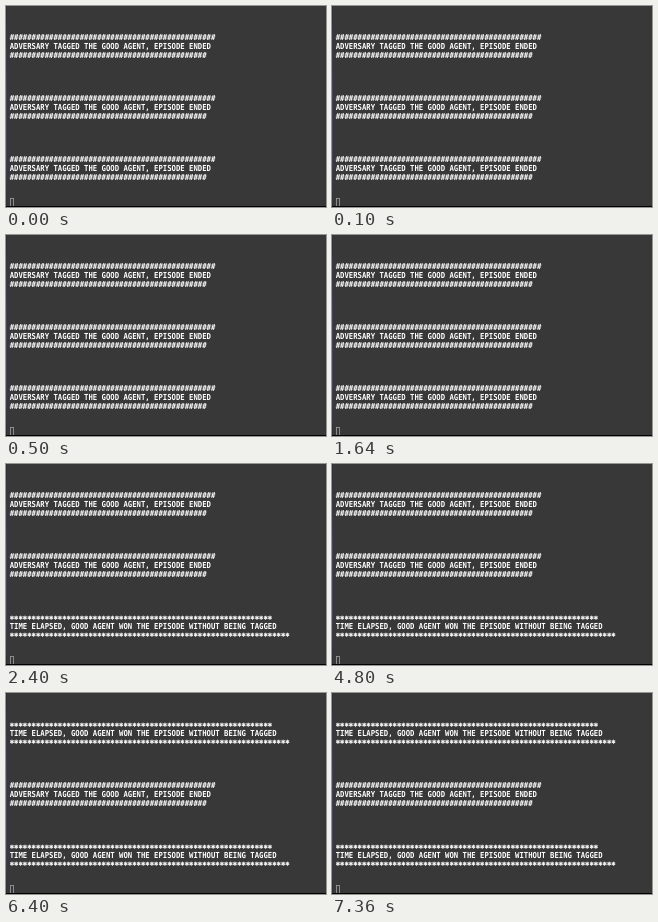
Recreate the animation shown at these times as an HTML page. Size 320 by 201 pixels, loop 8 s.

```html
<!DOCTYPE html>
<html lang="en">
<head>
<meta charset="utf-8">
<title>Episode log</title>
<style>
  html, body { margin: 0; width: 100%; height: 100%; overflow: hidden; background: #383838; }
  svg { display: block; width: 100vw; height: 100vh; }
  text {
    font: bold 7.27px "DejaVu Sans Mono", monospace;
    fill: #fff;
    text-rendering: geometricPrecision;
    white-space: pre;
  }
  .stars { stroke: #fff; stroke-width: .3px; }
  .top > *, .bottom > * { animation: 8s step-end infinite; }
  .top > .tagged { animation-name: top-tagged; }
  .top > .won { animation-name: top-won; }
  .bottom > .tagged { animation-name: bottom-tagged; }
  .bottom > .won { animation-name: bottom-won; }
  @keyframes top-tagged { 0% { visibility: visible } 80%, 100% { visibility: hidden } }
  @keyframes top-won { 0% { visibility: hidden } 80%, 100% { visibility: visible } }
  @keyframes bottom-tagged { 0% { visibility: visible } 30%, 100% { visibility: hidden } }
  @keyframes bottom-won { 0% { visibility: hidden } 30%, 100% { visibility: visible } }
</style>
</head>
<body>
<svg viewBox="0 0 320 201" preserveAspectRatio="none">
  <defs>
    <linearGradient id="edge" x2="0" y2="1">
      <stop offset="0" stop-color="#303034"/>
      <stop offset=".4" stop-color="#45425c"/>
      <stop offset=".75" stop-color="#45425c"/>
      <stop offset="1" stop-color="#303034"/>
    </linearGradient>
  </defs>
  <rect width="320" height="201" fill="#383838"/>
  <rect width="1" height="201" fill="url(#edge)"/>
  <rect x="4.5" y="192.5" width="3" height="8" fill="none" stroke="#a0a0a0" stroke-width=".8"/>
  <rect y="200" width="320" height="1" fill="#000"/>
  <g id="log"></g>
</svg>
<script>
  const LINE = 8.71, LEFT = 3.7, BASELINE = 43, BLOCK = 7 * LINE;
  const TALL = 1.14; // the terminal face has taller letters

  const row = (text, y, kind = 'words') =>
    `<text class="${kind}" transform="translate(${LEFT} ${y.toFixed(2)}) scale(1 ${TALL})">${text}</text>`;

  const banner = (name, y, message, above, below) =>
    `<g class="${name}">${above(y - LINE)}${row(message, y)}${below(y + LINE)}</g>`;

  const hashes = count => y => row('#'.repeat(count), y);

  // The asterisk sits high in this font, so its rows are lowered.
  const stars = count => y => row('*'.repeat(count), y + 1.4, 'stars');

  const tagged = y => banner('tagged', y,
    'ADVERSARY TAGGED THE GOOD AGENT, EPISODE ENDED', hashes(47), hashes(45));

  const won = y => banner('won', y,
    'TIME ELAPSED, GOOD AGENT WON THE EPISODE WITHOUT BEING TAGGED', stars(60), stars(64));

  const middle = BASELINE + BLOCK, last = BASELINE + 2 * BLOCK;
  document.getElementById('log').innerHTML = `
    <g class="top">${tagged(BASELINE)}${won(BASELINE)}</g>
    ${tagged(middle)}
    <g class="bottom">${tagged(last)}${won(last)}</g>`;
</script>
</body>
</html>
```
